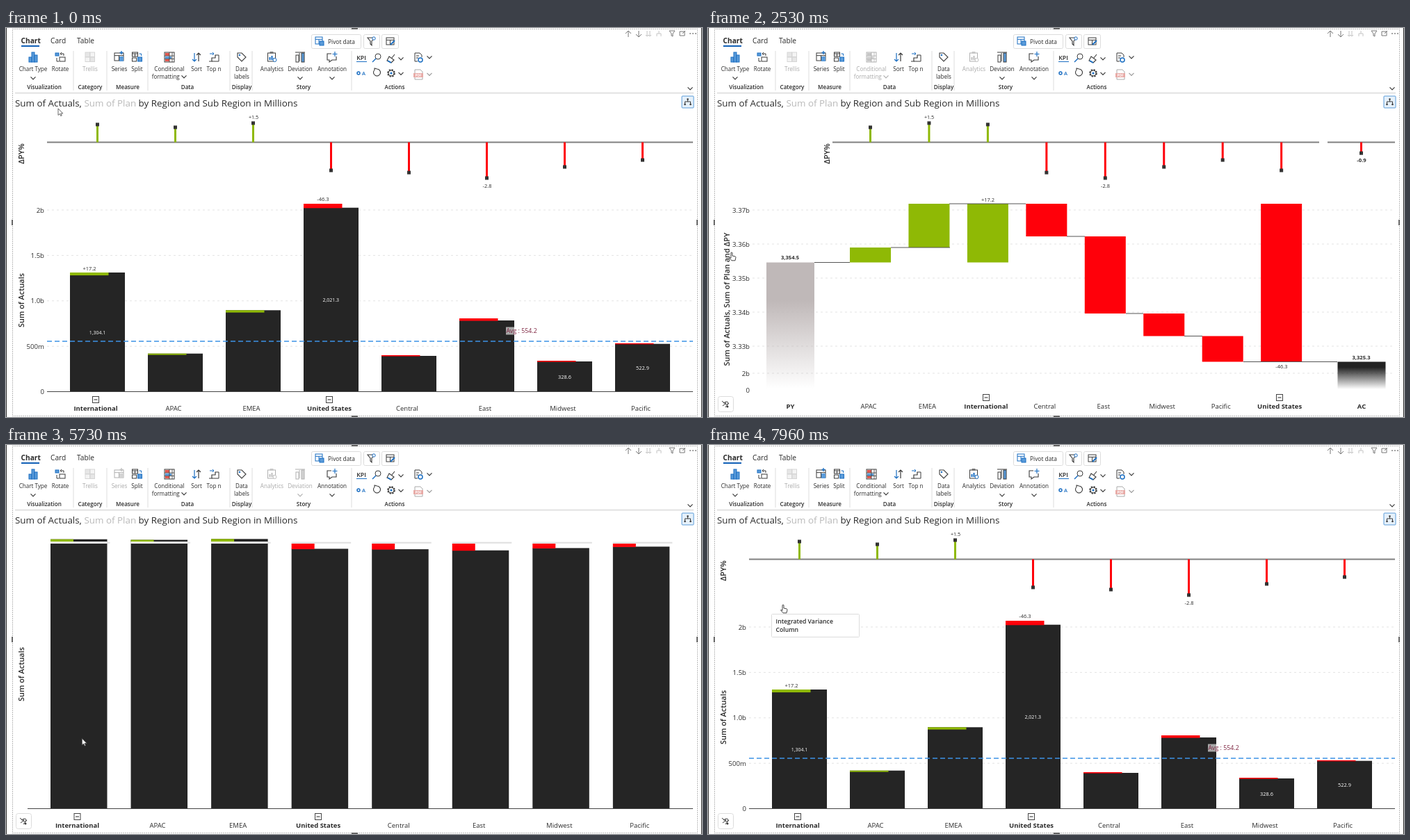
These frames come from a looping animation (1001 by 560 pixels, 8 s). An HTML page:

```html
<!DOCTYPE html>
<html lang="en">
<head>
<meta charset="utf-8">
<title>Chart type switcher</title>
<style>
html, body { margin: 0; width: 100%; height: 100%; overflow: hidden; background: #fff; }
svg { display: block; width: 1001px; height: 560px; font-family: "Open Sans", "Noto Sans", sans-serif; }
text { fill: #2b2b2b; white-space: pre; }
.m { text-anchor: middle; }
.e { text-anchor: end; }
.s { font-weight: 600; }
.b { font-weight: 700; }
.off { opacity: .4; filter: grayscale(1); }
</style>
</head>
<body>
<svg id="stage" viewBox="0 0 1001 560"></svg>
<script>
const BLUE = '#1b6ec2', DARK = '#3b3b3b', INK = '#252525', GREEN = '#8fb905', RED = '#ff000a';
const rect = (x, y, w, h, fill, extra = '') => `<rect x="${x}" y="${y}" width="${w}" height="${h}" fill="${fill}" ${extra}/>`;
const box = (x, y, w, h, stroke, fill = '#fff', r = 1) => rect(x + .5, y + .5, w - 1, h - 1, fill, `stroke="${stroke}" rx="${r}"`);
const path = (d, stroke = DARK, w = 1, fill = 'none', extra = '') => `<path d="${d}" stroke="${stroke}" stroke-width="${w}" fill="${fill}" ${extra}/>`;
const text = (x, y, s, size, cls = '', extra = '') => `<text x="${x}" y="${y}" font-size="${size}" class="${cls}" ${extra}>${s}</text>`;
const dot = (x, y, r, fill, extra = '') => `<circle cx="${x}" cy="${y}" r="${r}" fill="${fill}" ${extra}/>`;
const at = (x, y, body) => `<g transform="translate(${x} ${y})">${body}</g>`;
const group = (id, body) => `<g id="${id}">${body}</g>`;
const side = (x, y, s, size) => text(0, 0, s, size, 'm s', `transform="translate(${x} ${y}) rotate(-90)"`);
const chevron = (x, y, c = DARK) => path(`M${x - 3.5} ${y - 1.7}l3.5 3.5l3.5-3.5`, c, 1.2);
const toggle = (x, y) => box(x - 5, y - 5, 10, 10, '#444', '#fff', 0) + path(`M${x - 2.5} ${y}h5`, '#222');

/* ---- data ---- */
const names = ['International', 'APAC', 'EMEA', 'United States', 'Central', 'East', 'Midwest', 'Pacific'];
const change = [1.39, 1.17, 1.5, -2.2, -2.37, -2.8, -1.93, -1.39];
const tone = v => v > 0 ? GREEN : RED;
const isTotal = n => /^(Int|Uni|PY|AC)/.test(n);
const category = (x, y, n) => text(x, y, n, 9.5, isTotal(n) ? 'm b' : 'm');
const tick = (x, y, s, line = true) => text(x, y + 3.5, s, 9.6, 'e') +
  (line ? path(`M${x + 4} ${y}H988`, '#e3e3e3', 1, 'none', 'stroke-dasharray="3 4"') : '');
const pin = (x, v) => {
  const end = 164.5 - 18.4 * v;
  return rect(x - 1.5, Math.min(end, 164.5), 3, Math.abs(18.4 * v), tone(v)) + rect(x - 2.5, end - 2.5, 5, 5, '#333');
};
const axisLine = (a, b) => rect(a, 163.5, b - a, 2, '#808080');

function columnChart() {
  const tops = [352, 468.7, 406.3, 258.7, 472, 421, 480, 454.7];
  const plan = [355.5, 470, 409, 253, 471, 418, 479, 453.8];
  let out = axisLine(59, 988) + side(26, 181, 'ΔPY%', 11) + side(26, 392, 'Sum of Actuals', 10.9);
  ['2b', '1.5b', '1.0b', '500m'].forEach((s, i) => out += tick(55, 262 + 65.4 * i, s));
  out += tick(55, 523.5, '0', false);
  names.forEach((n, i) => {
    const x = 92 + 112 * i, v = change[i];
    out += pin(x + 39.5, v) + rect(x, tops[i], 79, 523 - tops[i], INK) +
      rect(x, Math.min(tops[i], plan[i]), 55.5, Math.abs(plan[i] - tops[i]) + .6, tone(v)) + category(x + 37, 551, n);
  });
  const white = 'style="fill:#fff"';
  return out + path('M59 523.5H988', '#444') +
    path('M59 451H988', '#3d92e6', 1.3, 'none', 'stroke-dasharray="7 4"') +
    rect(719, 430.5, 46, 11, '#fff', 'opacity=".6"') +
    text(719.5, 439.3, 'Avg : 554.2', 8.8, '', 'style="fill:#7d2440"') +
    text(131.5, 441, '1,304.1', 7, 'm', white) + text(467.3, 394, '2,021.3', 7, 'm', white) +
    text(803.5, 505, '328.6', 7.4, 'm', white) + text(915.5, 492, '522.9', 7.4, 'm', white) +
    text(120, 349, '+17.2', 7.5, 'm') + text(456, 249, '-46.3', 7.5, 'm') +
    text(356, 131, '+1.5', 7.2, 'm') + text(692, 229.5, '-2.8', 7.4, 'm') + toggle(129, 535) + toggle(465, 535);
}

function waterfall() {
  const order = [1, 2, 0, 4, 5, 6, 7, 3];
  const from = [316, 253, 253, 253, 300, 411, 443.5, 253];
  const to = [337.5, 316, 337.5, 300, 411, 443.5, 480.5, 480.5];
  const link = (a, b, y) => path(`M${a} ${y}H${b}`, '#555');
  const fade = (id, c, hold) => `<linearGradient id="${id}" x2="0" y2="1"><stop offset="${hold}" stop-color="${c}"/><stop offset="1" stop-color="${c}" stop-opacity="0"/></linearGradient>`;
  const title = 'Sum of Actuals, Sum of Plan and ΔPY';
  let out = `<defs>${fade('prev', '#bfb8b8', .3)}${fade('now', '#222', .2)}</defs>` +
    axisLine(179, 879) + axisLine(891, 988) + side(175, 181, 'ΔPY%', 11) +
    group('wideTitle', side(31, 390.5, title, 11.4)) + group('slimTitle', side(31, 390.5, title, 10.9));
  for (let i = 0; i < 5; i++) out += tick(60, 262 + 49 * i, (3.37 - i / 100).toFixed(2) + 'b');
  out += tick(60, 497, '2b') + tick(60, 521, '0', false) +
    rect(84, 337.5, 69, 182, 'url(#prev)') + rect(905.5, 480.5, 69, 39.5, 'url(#now)');
  order.forEach((k, i) => {
    const x = 204 + 84.45 * i;
    out += rect(x, from[i], 59, to[i] - from[i], tone(change[k])) + pin(x + 29.5, change[k]) + category(x + 27, 548, names[k]);
  });
  [[153, 204, 337.5], [263, 348, 316], [347, 457, 253], [516, 542, 300], [601, 626, 411], [685, 711, 443.5], [770, 905, 480.5]]
    .forEach(l => out += link(...l));
  return out + pin(939.5, -.85) + category(118.5, 548, 'PY') + category(940, 548, 'AC') +
    text(318, 131, '+1.5', 7.2, 'm') + text(571.5, 229.5, '-2.8', 7.4, 'm') + text(940, 193, '-0.9', 7.7, 'm b') +
    text(402.5, 249.5, '+17.2', 7.5, 'm') + text(825, 490, '-46.3', 7.5, 'm') +
    text(118, 333, '3,354.5', 7.6, 'm b') + text(939.5, 477, '3,325.3', 7.6, 'm b') + toggle(400, 532) + toggle(822, 532);
}

function bulletChart() {
  let out = side(26, 330, 'Sum of Actuals', 10.9);
  names.forEach((n, i) => {
    const x = 64 + 115.55 * i, v = change[i], top = 141 - 3.82 * v;
    out += rect(x, top, 81.5, 523 - top, INK);
    out += v > 0 ? rect(x, top, 33, 139 - top, GREEN) + rect(x, 139, 81.5, 3, '#fff') : rect(x, 142, 33, top - 141.5, RED);
    out += rect(x, 139.7, 85.5, 2, '#dedede') + category(x + 38.5, 551, n);
  });
  return out + path('M31 523.5H988', '#444') + toggle(102.5, 535) + toggle(449, 535);
}

/* ---- ribbon ---- */
const bars = '#5b9bd9';
const sheet = (x, y, w, h, c = DARK) => rect(x, y, w, h, '#fff', `stroke="${c}"`) + path(`M${x} ${y + h / 3}h${w}M${x + w / 2} ${y + h / 3}v${h * 2 / 3}`, c);
const icons = {
  type: rect(-6, 0, 4, 7, bars, `stroke="${BLUE}"`) + rect(-2, -7, 4, 14, bars, `stroke="${BLUE}"`) + rect(2, -3, 4, 10, bars, `stroke="${BLUE}"`),
  rotate: rect(-7, -6, 5, 4, bars, `stroke="${BLUE}"`) + rect(-1, 0, 8, 6, '#fff', `stroke="${DARK}"`) + path('M0-5h5v3M2-7l-2 2l2 2M-5 1v5h3', DARK),
  trellis: [0, 1, 2, 3].map(i => rect(i % 2 * 7 - 7, (i >> 1) * 7 - 7, 6.5, 6.5, i % 3 ? '#e4e4e4' : '#b8c4d0', 'stroke="#999"')).join(''),
  series: sheet(-7, -6, 13, 11) + rect(0, -1, 6, 7, bars) + path('M3-9v5M.5-6.5h5', BLUE, 1.3),
  split: sheet(-7, -7, 8, 6) + rect(-7, 1, 6, 5, '#fff', `stroke="${DARK}"`) + rect(1, 0, 6, 6, bars, `stroke="${BLUE}"`) + path('M3-5h3v3', BLUE),
  format: rect(-7, -7, 14, 14, '#fff', `stroke="${DARK}"`) + rect(-6, -6, 6, 4, '#e5584f') + rect(-6, -1, 9, 3, bars) + rect(-6, 3, 6, 3, '#e5584f') + path('M-7-2h14M-7 2.5h14M0-7v14M4-7v14', DARK, .8),
  sort: path('M-3-6v12M-6 3l3 3l3-3', BLUE, 1.2) + path('M3 6v-12M0-3l3-3l3 3', DARK, 1.2),
  top: path('M-7 6h4v-5h5v-4h5', DARK, 1.2) + path('M-6-5h6M-2-7l2 2l-2 2', BLUE) + path('M-3 6h10v-9', DARK),
  labels: path('M-6-6h6l6 6l-6 6l-6-6z', DARK, 1.1) + dot(-3, -3, 1.2, BLUE),
  analytics: rect(-6, -6, 11, 12, '#fff', `stroke="${DARK}"`) + rect(-3, -8, 5, 3, '#777') + path('M-3 4v-4M0 4v-6M3 4v-3', BLUE, 2) + dot(4, 4, 2.5, '#fff', `stroke="${BLUE}"`),
  deviation: rect(-6, -3, 4, 10, '#fff', `stroke="${DARK}"`) + rect(2, -6, 4, 13, bars, `stroke="${DARK}"`) + path('M-7-7h14M-1-6v12', DARK),
  note: path('M-1-5h-6v9h3v3l4-3h6v-5', DARK, 1.1) + path('M4-8v7M.5-4.5h7', BLUE, 1.2)
};
const tool = (x, label, icon, arrow) => `<g id="tool-${icon}">` + at(x, 42, icons[icon]) +
  label.split('|').map((s, i) => text(x, 62 + 11 * i, s, 8.1, 'm')).join('') + (arrow ? chevron(...arrow) : '') + '</g>';

function ribbon() {
  let out = rect(13, 92.8, 976, 1.4, '#dcdcdc') + rect(13, 94, 976, 1, '#f1f1f1');
  out += group('typeHover', rect(17, 33, 44.5, 45, '#d2d0ce'));
  out += text(21.5, 22, 'Chart', 10.2, 'b') + text(64, 22, 'Card', 10.2) + text(102, 22, 'Table', 10.2) + rect(22, 25, 26, 2, '#1160b7');
  [97, 145, 204, 322, 354, 497].forEach(x => out += rect(x - .5, 33, 1, 57, '#dedede'));
  out += tool(39, 'Chart Type', 'type', [39, 72]) + tool(78, 'Rotate', 'rotate') + tool(121, 'Trellis', 'trellis') +
    tool(163, 'Series', 'series') + tool(188.5, 'Split', 'split') + tool(235, 'Conditional|formatting     ', 'format', [256, 70]) +
    tool(274, 'Sort', 'sort') + tool(299, 'Top n', 'top') + tool(339, 'Data|labels', 'labels') + tool(382.5, 'Analytics', 'analytics') +
    tool(423, 'Deviation', 'deviation', [423, 72]) + tool(469, 'Annotation', 'note', [469, 72]);
  [[55, 'Visualization'], [121, 'Category'], [175, 'Measure'], [261, 'Data'], [339, 'Display'], [428, 'Story'], [559, 'Actions']]
    .forEach(([x, s]) => out += text(x, 87.5, s, 8.1, 'm s'));
  out += text(511, 46, 'KPI', 8.8, 'm s') + rect(504, 48, 15, 1, BLUE) + dot(507, 65, 2, '#fff', `stroke="${BLUE}" stroke-width="1.5"`) + text(514.5, 68, 'A', 7.5, 'm s', `style="fill:${BLUE}"`);
  out += dot(535, 41, 4, '#fff', `stroke="${DARK}"`) + path('M532 44l-5 5', BLUE, 1.5) + path('M529.5 61a5 5 0 1 0 4-2l-3-1M530 61v-3.5', DARK, 1.1);
  out += path('M559 38l-4 5M551 41l7 5l-4 4l-6-3z', DARK, 1.1) + path('M549 47l5 3', BLUE, 2);
  out += dot(554, 65, 5, '#fff', `stroke="${DARK}" stroke-width="1.6" stroke-dasharray="2.4 1.5"`) + dot(554, 65, 4, '#fff', `stroke="${DARK}"`) + dot(554, 65, 1.6, BLUE);
  out += chevron(568, 44) + chevron(568, 65.5) + chevron(609, 42) + chevron(609, 66.5, '#999');
  out += path('M588 36h7l3 3v3M588 36v12h4M590 40h4M590 43h3', DARK) + dot(596, 46, 3, '#fff', `stroke="${BLUE}" stroke-width="1.5"`);
  out += path('M588 60h8l3 3v11h-11z', '#aaa') + rect(586, 65, 14, 6, '#e8aaa6') + text(593, 70, 'PDF', 4.8, 'm b', 'style="fill:#fff"');
  out += box(439, 9, 72, 21, '#dcdcdc', '#fff', 2) + box(514, 9, 24, 21, '#dcdcdc', '#fff', 2) + box(540, 9, 25, 21, '#dcdcdc', '#fff', 2);
  out += sheet(445, 13, 10, 10, BLUE) + rect(451, 19, 6, 6, bars, `stroke="${BLUE}"`) + text(463, 22.5, 'Pivot data', 8.4);
  out += path('M520 14h10l-4 5v6l-2-2v-4z', DARK, 1.1) + dot(529, 15, 2.2, '#fff', `stroke="${BLUE}"`) + sheet(547, 14, 11, 10) + path('M553 24l6-6', BLUE, 1.8);
  out += chevron(984, 87);
  return out + `<text x="13" y="112.5" font-size="13.4">Sum of Actuals, <tspan fill="#b9b9b9">Sum of Plan</tspan> by Region and Sub Region in Millions</text>` +
    box(971.5, 97.5, 18, 18, '#5a9bd8', '#e6f1fb') + path('M980.5 102v4M976.5 109v-3h8v3', DARK) + dot(980.5, 102.5, 1.3, DARK) + dot(976.5, 110, 1.3, DARK) + dot(984.5, 110, 1.3, DARK);
}

function border() {
  const g = '#777', pale = '#c4c4c4';
  return rect(0, 0, 1, 560, '#333') + rect(1000, 0, 1, 560, '#333') +
    rect(9.5, 1.5, 985, 557, 'none', 'stroke="#777" stroke-dasharray="1 2"') +
    rect(497, 0, 9, 2, '#666') + rect(497, 558, 9, 2, '#666') + rect(8, 276, 2, 8, '#666') + rect(993, 276, 2, 8, '#666') +
    path('M895 13v-9M891 8l4-4l4 4M910 4v9M906 9l4 4l4-4', g) + path('M922 4v8M926 4v8M920 10l2 2l2-2M924 10l2 2l2-2M939 4v4M936 12v-4h6v4', pale) +
    path('M954 4h8l-3 4v4l-2-1v-3z', g) + path('M969 5h7v6h-7zM973 8l4-4', g) + [984, 988, 992].map(x => dot(x, 8, .9, g)).join('');
}

/* ---- chart type menu ---- */
const ink = { k: '#252525', d: '#555', m: '#888', l: '#b9b9b9', f: '#dadada', g: '#7ac70c', r: '#f0202a', b: '#5ba3e6' };
// Columns are split by spaces, stacked parts by slashes; a part is height plus colour key, n is a gap.
function glyph(spec, gap = 2, base = 'k') {
  const cols = spec.split(' '), step = 23 / cols.length;
  let out = '';
  cols.forEach((col, i) => {
    let y = 24;
    col.split('/').forEach(part => {
      const h = parseFloat(part);
      y -= h;
      if (!part.endsWith('n')) out += rect(4.5 + step * i + gap / 2, y, step - gap, h, ink[part.slice(-1)]);
    });
  });
  return out + (base ? rect(4, 24, 24, 1, ink[base]) : '');
}
const pencil = path('M21 26l1-3l4-4l2 2l-4 4z', '#444', 1, '#fff');
const pins = (keys, ends) => [...keys].map((c, i) => {
  const x = 8 + 7.5 * i, y = 8 + i * 5 % 4;
  return path(`M${x} ${y}V24`, ink[c]) + dot(x, y, 1.6, ink.k) + (ends ? dot(x, 23, 1.6, ink.k) : '');
}).join('');
const arrow = (x, d, c) => path(`M${x} ${16 - 8 * d}V${16 + 8 * d}M${x - 2.5} ${16 - 5 * d}L${x} ${16 - 8 * d}L${x + 2.5} ${16 - 5 * d}`, c, 1.2);
const arch = (a, b, c) => glyph(`6${a} 4n/5${a} 8n/5${b} 11n/5${b} 8n/6${c} 9${a}`, .4, 'l');
const rows = [
  [179.5, [glyph('7k 12k 9k 15k'), glyph('17k 17k 17k', 1), glyph('10k 16k 12k', .6), glyph('4d/3m/2l 5d/4m/3l 6d/3m/4l 7d/5m/3l'), glyph('7d/5m/5l 5d/6m/6l 8d/4m/5l 6d/6m/5l'), glyph('5k 8m 7k 12m 10k 16m', .7)]],
  [215, [glyph('8d/4l 7k/3m 10d/4m', .6), glyph('5d/4l/8m 8m/5d/4l 6d/5l/6m', .6), glyph('6k/4g 9k/3g 8k/2r 11k/4g'), glyph('9n/10g 9n/6g 9n 1n/8r', 2, '') + rect(4, 15, 24, 1, '#999')]],
  [268, [arch('l', 'l', 'l'), arch('k', 'd', 'k'), arch('f', 'f', 'f'), glyph('8m 4n/12l 17m 5n/11l 12m') + pencil, glyph('8n/10g 4n/14r 16k 6n/9g 2n/12r', .8), glyph('6k 8k/3g 11k/5g 10k/3r 12k/4g')]],
  [303, [arch('l', 'g', 'r')]],
  [356, [pins('ddd') + rect(4, 24, 24, 1, ink.k), glyph('3r/9f 5g/11f 3r/8f 6b/10f'), glyph('4n/10f 2n/14l 5n/9f 3n/13l', 2, 'l') + pencil]],
  [409, [glyph('16g 16r', 5) + rect(5, 13, 22, 1.2, ink.k), glyph('12b/3d 16b', 5) + rect(5, 14, 10, 2, ink.d), glyph('9k/7g 9k/3r', 5) + rect(5, 13, 22, 1, ink.d), glyph('8d/4l 10k/6l 9d/4l') + rect(5, 15, 22, 1, ink.k), pins('ggr', true), pins('kkk', true)]],
  [443.5, [glyph('4n/16g 6n/12g 1n/10r', 1, ''), arrow(8, 1, ink.g) + arrow(15, 1, ink.g) + arrow(23, -1, ink.r)]],
  [524, ['#ccc', '#ddd', '#bbb', '#b8b08a', GREEN].map((c, i) => path(`M5 25v-${9 + i}l6 4l7-6l9 8v4z`, i < 3 ? '#aaa' : RED, .6, c))]
];
const cells = rows.flatMap(([y, list]) => list.map((body, i) => ({ x: 21 + 35 * i, y, body })));
const disabled = [cells[12], cells[19]];
const selected = [cells[8], cells[16], cells[22]];

function menu() {
  const caption = (y, s) => text(21, y, s, 7.3, '', 'style="fill:#444"');
  const mini = (x, y, d, on) => (on ? box(x - 7.5, y - 7.5, 15, 15, '#4a94d8', '#edf5fc') : '') + path(d, on ? BLUE : DARK, 1, 'none', `transform="translate(${x} ${y})"`);
  let out = rect(13, 79, 225.5, 459, '#fff', 'style="filter:drop-shadow(0 1px 2px #0004)"') +
    text(30, 93, 'All', 8.8, 'm') + text(58.5, 93, 'Scenarios', 8.7) + rect(13, 100.5, 225, .8, '#ddd') + rect(13, 99.5, 34, 2, BLUE) +
    box(21, 109, 210, 22, '#dedede') + dot(33, 118.5, 3, 'none', 'stroke="#555"') + path('M31 121l-4 4', '#555') +
    text(40, 123.7, 'Search', 9.6, '', 'style="fill:#555"') + rect(13, 137.5, 225, .8, '#e2e2e2') + rect(235, 138, 3, 295, '#c3c3c3') +
    text(21, 157.3, 'Comparison / Composition', 8.7, 's') + caption(173.8, 'Column charts') + caption(262, 'Waterfall charts') +
    caption(350, 'Special charts') + caption(402.5, 'Bullet charts') + rect(21, 484.5, 210, .8, '#ddd') +
    text(21, 502, 'Sparkline', 8.6, 's') + caption(518, 'Area charts') +
    mini(203.5, 154, 'M-4 4v-7h2v7M0 4v-4h2v4M-5 4h10M4 4v-3', true) + mini(219, 154, 'M-4-4v8M-4-3h8v2h-8M-4 1h6v2h-6') +
    mini(188, 498.5, 'M-5-5v9h10M-4 2l3-4l3 2l3-3', true) + mini(203, 498.5, 'M-5-5v9h10M-4 2c3-9 4 5 8-4') + mini(219, 498.5, 'M-5-5v9h10M-4 2h3v-5h3v3h2v-4');
  cells.forEach((c, i) => out += at(c.x, c.y, `<rect id="cell${i}" x=".5" y=".5" width="30.5" height="30.5" rx="1"/>` + c.body));
  return `<clipPath id="panel"><rect x="0" y="70" width="243" height="468"/></clipPath><g clip-path="url(#panel)">${out}</g>`;
}

const corner = box(14, 530, 23, 23, '#dcdcdc', '#fff', 3) + path('M20 537l5 4l-4 3M22 540l4-2M25 546l5-6', DARK) + dot(27, 540, 2, '#fff', `stroke="${DARK}"`) + dot(28, 545, 1.5, DARK);
const tip = box(91, 243, 127, 34, '#dcdcdc') + text(97.5, 257, 'Integrated Variance', 8.7, 's') + text(97.5, 269, 'Column', 8.7, 's');
const pointer = group('arrow', path('M0 0v9.5l2.3-2l1.5 3.2l1.4-.7l-1.4-3h3z', '#444', .8, '#fff')) +
  group('hand', path('M-1 7V1a1 1 0 0 1 2 0v4l4 .8q1 .3 1 1.5l-1 4.5h-5l-3.5-4q0-1.5 2.5 .5z', '#333', .9, '#fff'));

const stage = document.getElementById('stage');
stage.innerHTML = border() + group('chart0', columnChart()) + group('chart1', waterfall()) + group('chart2', bulletChart()) +
  ribbon() + group('menu', menu()) + group('corner', corner) + group('tip', tip) + group('pointer', pointer);

/* ---- motion ---- */
const LOOP = 8000;
const moves = [
  { start: 400, end: 860, steps: 15, to: [38, 69] },
  { start: 1600, end: 2230, steps: 20, to: [34, 323] },
  { start: 3000, end: 3660, steps: 20, to: [39, 71] },
  { start: 4560, end: 5100, steps: 17, to: [110, 426] },
  { start: 5730, end: 6260, steps: 17, to: [42, 69] },
  { start: 6960, end: 7430, steps: 15, to: [108, 230] }
];
const openSpans = [[1100, 2530], [3860, 5360], [6560, 7830]];
const $ = id => document.getElementById(id);
const show = (id, on) => $(id).style.display = on ? '' : 'none';

function cursorAt(t) {
  let pos = [75, 116], resting = false;
  for (const m of moves) {
    if (t < m.start) break;
    const step = Math.floor((t - m.start) / (m.end - m.start) * (m.steps - 1) + 1e-6) + 1;
    const p = Math.min(1, step / m.steps), ease = p * p * (3 - 2 * p);
    pos = pos.map((v, i) => v + (m.to[i] - v) * ease);
    resting = p === 1;
  }
  return { x: pos[0], y: pos[1], resting };
}

function render(t) {
  const view = t < 2530 || t >= 7830 ? 0 : t < 5360 ? 1 : 2;
  const open = openSpans.some(([a, b]) => t >= a && t < b);
  const { x, y, resting } = cursorAt(t);
  const onType = x > 17 && x < 61 && y > 33 && y < 78;
  const hovered = open && cells.find(c => x >= c.x && x < c.x + 31 && y >= c.y && y < c.y + 31);
  [0, 1, 2].forEach(i => show('chart' + i, i === view));
  show('slimTitle', t < 2800);
  show('wideTitle', t >= 2800);
  show('menu', open);
  show('corner', t >= 60);
  show('tip', t >= 7830);
  show('typeHover', onType);
  const hand = onType || hovered || resting;
  show('hand', hand);
  show('arrow', !hand);
  $('pointer').setAttribute('transform', `translate(${x} ${y})`);
  const off = ['trellis', ...[[], ['format', 'analytics'], ['series', 'analytics', 'deviation']][view]];
  Object.keys(icons).forEach(k => $('tool-' + k).classList.toggle('off', off.includes(k)));
  cells.forEach((c, i) => {
    const active = c === selected[view];
    $('cell' + i).setAttribute('fill', active ? '#edf5fc' : disabled.includes(c) ? '#ececec' : '#fff');
    $('cell' + i).setAttribute('stroke', active || c === hovered ? '#4a94d8' : '#dcdcdc');
  });
}

const began = performance.now();
function loop() {
  render((performance.now() - began) % LOOP);
  requestAnimationFrame(loop);
}
render(0);
requestAnimationFrame(loop);
</script>
</body>
</html>
```
